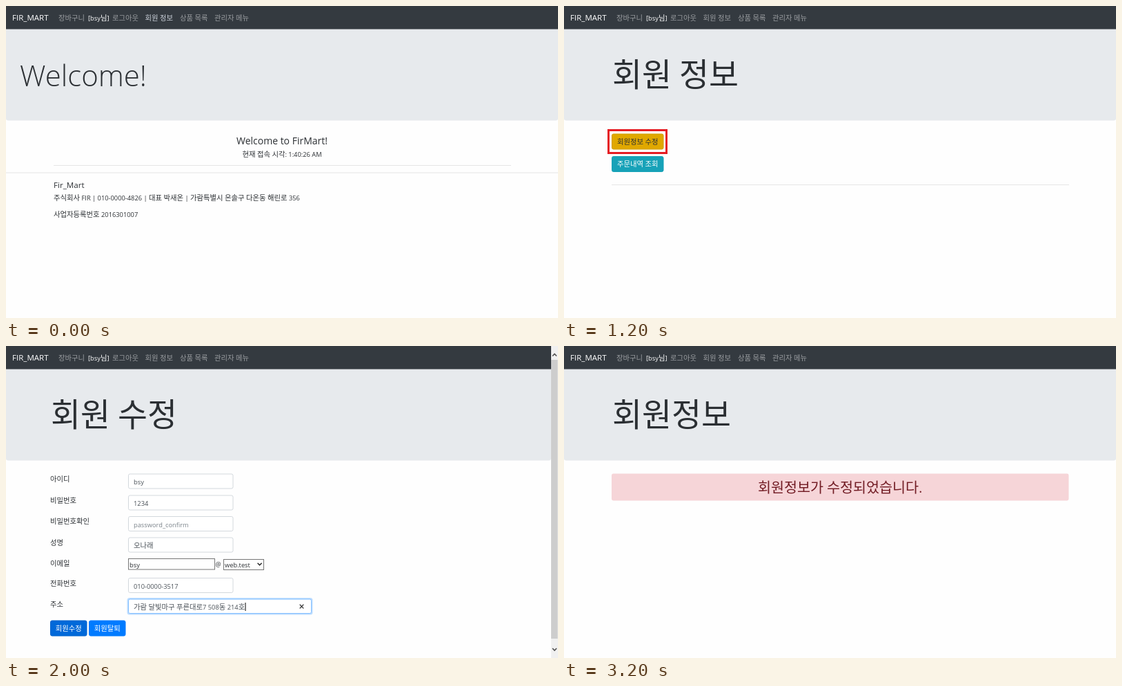
Animation, 800 px wide and 451 px high, one loop 3.6 s. Source, as an HTML page:

```html
<!DOCTYPE html>
<html lang="ko">
<head>
<meta charset="utf-8">
<title>Member info walkthrough</title>
<style>
  html, body { margin: 0; width: 100%; height: 100%; overflow: hidden; background: #fefefe; }
  svg { display: block; width: 800px; height: 451px; }
  text { font-family: "Open Sans", "Noto Sans", "Noto Sans CJK KR", "Noto Sans CJK", sans-serif; }
  .ko { font-family: "Noto Sans CJK KR", "Noto Sans CJK", sans-serif; font-size: 1.113em; }
</style>
</head>
<body>
<svg id="stage" viewBox="0 0 800 451" xmlns="http://www.w3.org/2000/svg"></svg>
<script>
const STEP = 400;
const INK = '#2b2f33', FIELD = '#495057', BODY = 9.3;

const attrs = o => Object.entries(o).map(([k, v]) => ` ${k}="${v}"`).join('');
const rect = (x, y, width, height, o = {}) => `<rect${attrs({ x, y, width, height, ...o })}/>`;
const path = (d, o) => `<path${attrs({ d, fill: 'none', ...o })}/>`;

// Hangul runs are set slightly larger than the Latin letters beside them.
const text = (x, y, s, o = {}) =>
  `<text${attrs({ x, y, 'font-size': BODY, fill: INK, ...o })}>` +
  s.replace(/[가-힣]+/g, '<tspan class="ko">$&</tspan>') + '</text>';

const rule = (x1, x2, y) => rect(x1, y, x2 - x1, 1, { fill: '#e6e6e6' });
const mark = (x, y, w, h, o = {}) =>
  rect(x, y, w, h, { fill: 'none', stroke: '#e51c23', 'stroke-width': 3, ...o });

const button = (x, y, w, label, fill, edge = fill, ink = '#fff') =>
  rect(x + .5, y + .5, w - 1, 22, { rx: 2.2, fill, stroke: edge }) +
  text(x + w / 2, y + 15.3, label, { fill: ink, 'text-anchor': 'middle' });

const input = (y, value, fill = FIELD) =>
  rect(177.5, y + .5, 151.5, 21, { rx: 2.2, fill: '#fff', stroke: '#d3d8dd' }) +
  text(185, y + 15.5, value, { fill });

function header(hover, width = 800) {
  const dim = '#9a9da0';
  const links = [[76, '장바구니'], [154, '로그아웃'], [201.5, '회원 정보'], [252, '상품 목록'], [302, '관리자 메뉴']];
  return rect(0, 30, width, 135.5, { rx: 3, fill: '#e7eaed' }) +
    rect(0, 0, width, 33.5, { fill: '#343a40' }) +
    text(9, 21.3, 'FIR_MART', { 'font-size': 11.5, fill: '#fff' }) +
    text(119, 20.7, '[bsy님]', { fill: '#fff', 'font-weight': 500 }) +
    links.map(([x, s]) => text(x, 21, s, { fill: hover && x === 201.5 ? '#cdd3dc' : dim })).join('');
}

const title = (x, y, s) => text(x, y, s, { 'font-size': 42, 'font-weight': 300 });

function home({ ring }) {
  const mid = { 'text-anchor': 'middle' };
  return header(true) +
    title(20, 116, 'Welcome!') +
    text(400, 199.5, 'Welcome to FirMart!', { 'font-size': 14, ...mid }) +
    text(400, 218, '현재 접속 시각: 1:40:26 AM', mid) +
    rule(69, 732, 230) + rule(0, 800, 240.5) +
    text(69, 262.5, 'Fir_Mart', { 'font-size': 11.6 }) +
    text(69, 281, '주식회사 FIR | 010-0000-4826 | 대표 박새온 | 가람특별시 은솔구 다온동 해린로 356') +
    text(69, 305, '사업자등록번호 2016301007') +
    (ring ? mark(197, 5.5, 48, 24.5, { rx: 6 }) : '');
}

function member({ ring }) {
  return header() + title(70, 115.5, '회원 정보') +
    button(69, 184.5, 75.5, '회원정보 수정', '#e0a800', '#d39e00', INK) +
    button(69, 217, 75.5, '주문내역 조회', '#17a2b8') +
    rule(69, 732, 258) +
    (ring ? mark(64.5, 179.5, 84, 33) : '');
}

function scrollbar() {
  const o = { stroke: '#505050', 'stroke-width': 1.6 };
  return rect(790, 0, 10, 451, { fill: '#f0f0f0' }) +
    rect(790, 20, 9.5, 403, { fill: '#cdcdcd' }) +
    path('M792 14.5l3-3 3 3', o) + path('M792 437l3 3 3-3', o);
}

function address(focus) {
  const base = '가람 달빛마구 푸른대로7';
  const box = { rx: 2.2, fill: '#fff', stroke: focus ? '#80bdff' : '#d3d8dd' };
  const glow = { rx: 3.5, fill: '#bfdeff' };
  return (focus ? rect(175.5, 364, 269, 24.5, glow) : '') +
    rect(177.5, 366, 265, 20.5, box) +
    text(185, 381, focus ? base + ' 508동 214호' : base, { fill: FIELD }) +
    (focus
      ? rect(346.5, 371, 1, 12, { fill: '#000' }) +
        path('M425.7 373.7l5.6 5.6m0-5.6l-5.6 5.6', { stroke: '#222', 'stroke-width': 1.2 })
      : '');
}

function edit({ focus, hover, ring = 0 }) {
  const labels = [[196, '아이디'], [226.5, '비밀번호'], [257, '비밀번호확인'], [288, '성명'],
    [318, '이메일'], [347, '전화번호'], [377, '주소']];
  const plain = { fill: '#fff', stroke: '#767676' };
  return header(false, 790) + title(65, 115.5, '회원 수정') + scrollbar() +
    labels.map(([y, s]) => text(64, y, s)).join('') +
    input(184.5, 'bsy') + input(215.5, '1234') +
    input(246, 'password_confirm', '#7b838a') + input(276.5, '오나래') +
    rect(177.5, 307.5, 125, 15.5, plain) + text(179, 319.7, 'bsy') +
    text(303.5, 319.3, '@', { 'font-size': 9 }) +
    rect(315.5, 308.5, 58, 15, plain) + text(317, 319.7, 'web.test') +
    path('M364.6 313.8l3 3 3-3', { stroke: '#222', 'stroke-width': 1.4 }) +
    input(335, '010-0000-3517') + address(focus) +
    button(64, 396.5, 53.5, '회원수정', hover ? '#0069d9' : '#007bff', hover ? '#0062cc' : '#007bff') +
    button(120, 396.5, 53.5, '회원탈퇴', '#007bff') +
    (ring > 0 ? mark(172.7, 361.7, 274.3, 28.6, { 'stroke-width': 3.4 }) : '') +
    (ring > 1 ? mark(60.7, 392.7, 60, 30.3, { 'stroke-width': 3.4 }) : '');
}

function done() {
  return header() + title(70, 115.5, '회원정보') +
    rect(69, 184.5, 662.5, 39, { rx: 2.4, fill: '#f6d5d8' }) +
    text(400, 211.7, '회원정보가 수정되었습니다.', { 'font-size': 18.6, fill: '#721c24', 'text-anchor': 'middle' });
}

const steps = [
  [home, {}], [home, { ring: 1 }],
  [member, {}], [member, { ring: 1 }],
  [edit, {}], [edit, { focus: true, hover: true }],
  [edit, { focus: true, ring: 1 }], [edit, { focus: true, ring: 2 }],
  [done, {}]
];

const stage = document.getElementById('stage');
const start = performance.now();
let shown = -1;

function tick() {
  const i = Math.floor((performance.now() - start) / STEP) % steps.length;
  if (i !== shown) {
    const [scene, state] = steps[i];
    stage.innerHTML = scene(state);
    shown = i;
  }
  requestAnimationFrame(tick);
}
tick();
</script>
</body>
</html>
```
